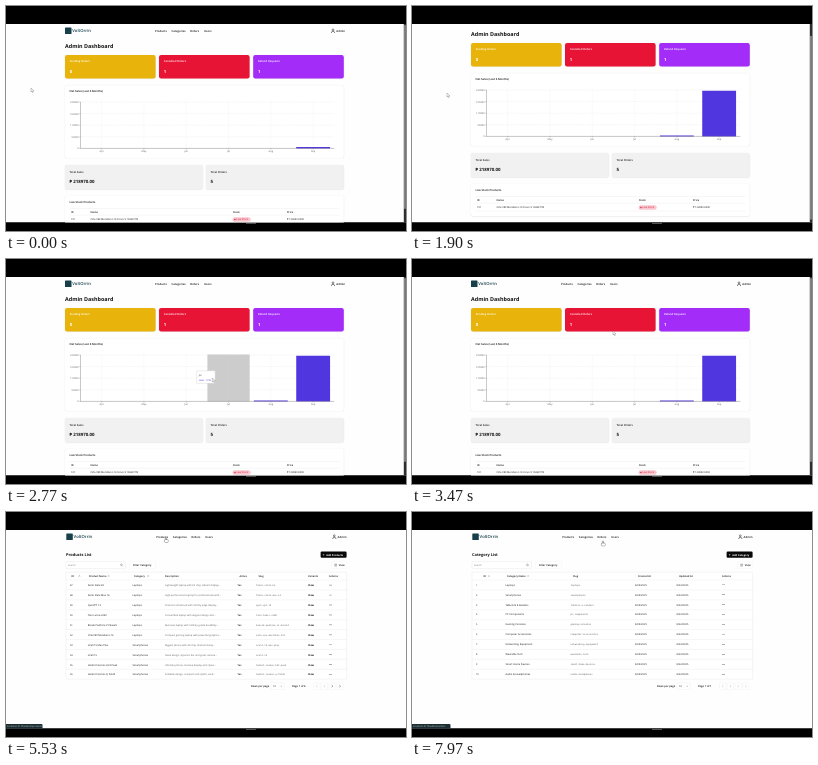
Write an HTML page with a canvas that moves like this. It is 400 px wide and 225 px high and loops after 8 s.

```html
<!DOCTYPE html>
<html lang="en">
<head>
<meta charset="utf-8">
<title>Shop admin</title>
<style>
html, body { margin: 0; width: 100%; height: 100%; overflow: hidden; background: #000; }
canvas { display: block; width: 100vw; height: 100vh; }
</style>
</head>
<body>
<canvas id="stage"></canvas>
<script>
const W = 400, H = 225, LOOP = 8000;
const VIEW = { top: 18, bottom: 216.5 };
const PRODUCTS_AT = 5100, CATEGORIES_AT = 7060;
const SANS = '"Open Sans", "Noto Sans", sans-serif';
const MONO = '"Noto Sans Mono", monospace';
const INK = '#111', GRAY = '#5c5c5c', LINE = '#e9e9e9';

const canvas = document.getElementById('stage');
const ctx = canvas.getContext('2d');

const clamp = v => Math.min(1, Math.max(0, v));
const ease = v => v * v * (3 - 2 * v);

// Keys are [time, ...values], eased between neighbours.
function track(keys, t) {
  if (t <= keys[0][0]) return keys[0].slice(1);
  for (let i = 1; i < keys.length; i++) {
    const a = keys[i - 1], b = keys[i];
    if (t <= b[0]) {
      const k = ease((t - a[0]) / (b[0] - a[0]));
      return a.slice(1).map((v, j) => v + (b[j + 1] - v) * k);
    }
  }
  return keys[keys.length - 1].slice(1);
}

function text(str, x, y, size, { color = INK, weight = 500, font = SANS, align = 'left' } = {}) {
  ctx.save();
  ctx.translate(x, y);
  ctx.scale(0.1, 0.1);
  ctx.font = `${weight} ${size * 10}px ${font}`;
  ctx.textAlign = align;
  ctx.fillStyle = color;
  ctx.fillText(str, 0, 0);
  ctx.restore();
}

function box(x, y, w, h, r, fill, stroke) {
  ctx.beginPath();
  ctx.roundRect(x, y, w, h, r);
  if (fill) { ctx.fillStyle = fill; ctx.fill(); }
  if (stroke) { ctx.strokeStyle = stroke; ctx.lineWidth = 0.4; ctx.stroke(); }
}

function line(points, color, width = 0.4, dash = []) {
  ctx.beginPath();
  points.forEach(([x, y], i) => i ? ctx.lineTo(x, y) : ctx.moveTo(x, y));
  ctx.strokeStyle = color;
  ctx.lineWidth = width;
  ctx.setLineDash(dash);
  ctx.stroke();
  ctx.setLineDash([]);
}

function card(x, y, w, h, fill) {
  ctx.save();
  ctx.shadowColor = 'rgba(0,0,0,.14)';
  ctx.shadowBlur = 1.2 * canvas.width / W;
  ctx.shadowOffsetY = 0.2 * canvas.width / W;
  box(x, y, w, h, 2.2, fill);
  ctx.restore();
}

function header(dx) {
  box(59 + dx, 21.5, 6.5, 6.5, 0.6, '#17404a');
  text('VoltOrrin', 66.3 + dx, 26.4, 4.2, { weight: 600, color: '#17404a' });
  [['Products', 149], ['Categories', 165.5], ['Orders', 184], ['Users', 198]]
    .forEach(([label, x]) => text(label, x + dx, 25.9, 2.75, { weight: 600 }));
  ctx.beginPath();
  ctx.arc(327 + dx, 23.8, 0.9, 0, 7);
  ctx.moveTo(325.3 + dx, 27);
  ctx.arc(327 + dx, 27, 1.7, Math.PI, 0);
  ctx.strokeStyle = INK;
  ctx.lineWidth = 0.5;
  ctx.stroke();
  text('Admin', 330.3 + dx, 26, 2.8, { weight: 600 });
}

// Dashboard

const CHART = { x: 74.5, y: 96, w: 253.8, h: 46.4 };
const BAND = CHART.w / 6;
const MONTHS = ['Apr', 'May', 'Jun', 'Jul', 'Aug', 'Sep'];
const SALES = [0, 0, 0, 0, 0.02, 0.985];

const scrollKeys = [[870, 0], [1000, 5], [1250, 12], [1950, 12], [2480, 0]];
const tipKeys = [[2390, 92, 98.5], [2740, 190, 112], [2980, 205, 108]];

function chart(t, cursor) {
  const { x, y, w, h } = CHART, base = y + h;
  const inside = t > 2100 && cursor[0] > x && cursor[0] < x + w && cursor[1] > y - 1 && cursor[1] < base;
  const hovered = inside ? Math.floor((cursor[0] - x) / BAND) : -1;

  for (let i = 0; i < 5; i++) {
    const gy = y + h * i / 4;
    line([[x, gy], [x + w, gy]], '#d2d2d2', 0.3, [0.7, 0.7]);
    line([[x - 1.2, gy], [x, gy]], '#777');
    text(String(220000 - 55000 * i), x - 1.8, gy + 0.9, 2.5, { color: GRAY, align: 'right' });
  }
  if (hovered >= 0) box(x + hovered * BAND, y - 0.4, BAND, h + 0.4, 0, '#cccccc');

  const grow = 0.025 + 0.975 * (1 - (1 - clamp(t / 430)) ** 3);
  MONTHS.forEach((month, i) => {
    const left = x + i * BAND, mid = left + BAND / 2;
    line([[mid, y], [mid, base]], '#dcdcdc', 0.3, [0.7, 0.7]);
    line([[mid, base], [mid, base + 1.2]], '#777');
    const bar = SALES[i] * h * grow;
    if (bar > 0.1) box(left + BAND * 0.1, base - bar, BAND * 0.8, bar, 0, '#4f36df');
    text(month, mid, base + 4, 2.5, { color: GRAY, align: 'center' });
  });
  line([[x, y], [x, base], [x + w, base]], '#777');

  if (hovered >= 0) {
    const [tx, ty] = track(tipKeys, t);
    box(tx, ty, 18.5, 12.5, 0.3, '#fff', '#ccc');
    text(MONTHS[hovered], tx + 2, ty + 5, 2.4, { color: '#333' });
    text('sales : 0.00', tx + 2, ty + 9.8, 2.4, { color: '#4f36df' });
  }
}

function dashboard(t, cursor) {
  const [scroll] = track(scrollKeys, t);
  ctx.save();
  ctx.translate(0, -scroll);
  header(0);
  text('Admin Dashboard', 59, 41.5, 5.4, { weight: 700 });

  [['Pending Orders', '0', 59, '#e8b30b'],
   ['Cancelled Orders', '1', 153, '#e81435'],
   ['Refund Requests', '1', 247.2, '#a42cf8']].forEach(([label, value, x, fill]) => {
    card(x, 49, 90.6, 23.4, fill);
    text(label, x + 4.7, 56.1, 2.7, { color: '#fff', weight: 600 });
    text(value, x + 4.7, 66.7, 4.2, { color: '#fff', weight: 700 });
  });

  card(59, 79.3, 278.8, 72.6, '#fff');
  text('Net Sales (Last 6 Months)', 63.5, 86.1, 2.75, { weight: 600 });
  chart(t, [cursor[0], cursor[1] + scroll]);

  [['Total Sales', '₱ 218970.00', 59], ['Total Orders', '5', 200]].forEach(([label, value, x]) => {
    card(x, 159, 137.8, 24.4, '#f1f1f1');
    text(label, x + 4.5, 166.6, 2.75, { weight: 600, color: '#222' });
    text(value, x + 4.5, 177, 4.4, { weight: 700 });
  });

  card(59, 189.8, 278.8, 32.5, '#fff');
  text('Low Stock Products', 63.5, 196.7, 2.75, { weight: 600 });
  line([[63.5, 202.5], [333.5, 202.5]], LINE);
  [['ID', 65], ['Name', 84.5], ['Stock', 227], ['Price', 281]]
    .forEach(([label, x]) => text(label, x, 207.1, 2.55, { weight: 600 }));
  line([[63.5, 209.2], [333.5, 209.2]], LINE);
  text('101', 65, 214.4, 2.5);
  text('Orla VEX Meridian L14 Corvo 9 16GB/1TB', 84.5, 214.4, 2.5);
  box(226.5, 211.3, 18.2, 4.4, 2.2, '#f9c6cf');
  box(228.2, 212.8, 1.4, 1.4, 0.7, '#d51f3c');
  text('Low Stock', 230.5, 214.4, 2.5, { color: '#d51f3c' });
  text('₱ 124990.0000', 281, 214.4, 2.5);
  line([[63.5, 217], [333.5, 217]], LINE);
  ctx.restore();

  box(397.8, VIEW.top, 2.2, VIEW.bottom - VIEW.top, 0, '#2e2e2e');
  box(398.2, 19 + scroll * 0.9, 1.5, 184, 0.7, '#9a9a9a');
}

// List pages

const rowLine = i => 73.9 + i * 9.95;
const slugify = name => name.toLowerCase().replace(/&/g, '').replace(/ +/g, '-');

const PRODUCTS = [
  ['Fenlo Slate K2', 'Lightweight laptop with K2 chip, vibrant display...'],
  ['Fenlo Slate Max 14', 'High-performance laptop for professionals with...'],
  ['Quil VPT 13', 'Premium ultrabook with infinity edge display...'],
  ['Tarn Lumis v360', 'Convertible laptop with elegant design and...'],
  ['Brevik PadCore V1 Basalt', 'Business laptop with military-grade durability...'],
  ['Orla VEX Meridian L14', 'Compact gaming laptop with powerful graphics...'],
  ['oCall 15 Max Plus', 'Biggest phone with A9 chip, titanium body...'],
  ['oCall 15', 'Sleek design, dynamic bar and great camera...'],
  ['Hanbit Cosmos H23 Peak', 'Ultimate phone, massive display and stylus...'],
  ['Hanbit Cosmos Q Fold5', 'Foldable design, compact and stylish, vivid...']
];
const CATEGORIES = ['Laptops', 'Smartphones', 'Tablets & E-Readers', 'PC Components', 'Gaming Consoles',
  'Computer Accessories', 'Networking Equipment', 'Wearable Tech', 'Smart Home Devices', 'Audio & Headphones'];

function sortMark(x, y) {
  line([[x, y - 1.1], [x + 0.6, y - 1.7], [x + 1.2, y - 1.1]], '#444', 0.3);
  line([[x, y - 0.6], [x + 0.6, y], [x + 1.2, y - 0.6]], '#444', 0.3);
}

function dots(x, y) {
  for (let i = 0; i < 3; i++) box(x + i * 1.1, y - 1.2, 0.7, 0.7, 0.35, INK);
}

function listPage(title, action, columns, pages) {
  header(1.3);
  text(title, 60, 44.2, 3.95, { weight: 700 });
  box(314.6, 39.5, 26, 6.3, 1.2, '#080808');
  text('+', 316.8, 43.7, 3.2, { color: '#fff', weight: 700 });
  text(action, 320.2, 43.6, 2.55, { color: '#fff', weight: 700 });

  box(60, 49.6, 59.5, 7, 1, '#fff', '#e2e2e2');
  text('Search', 62, 54, 2.4, { color: '#777' });
  ctx.beginPath();
  ctx.arc(115.4, 52.8, 0.9, 0, 7);
  ctx.strokeStyle = GRAY;
  ctx.lineWidth = 0.35;
  ctx.stroke();
  line([[116, 53.5], [116.8, 54.3]], GRAY, 0.35);
  box(123.5, 49.6, 26, 7, 1, '#fff', '#f0f0f0');
  text('Filter Category', 127, 53.9, 2.6, { weight: 600 });
  box(325.5, 49.6, 15.2, 7, 1, '#fff', '#f0f0f0');
  line([[328.3, 52.3], [331, 52.3]], INK);
  line([[328.3, 53.9], [331, 53.9]], INK);
  text('View', 332.8, 53.9, 2.6, { weight: 600 });

  box(60, 60.2, 280.7, 107, 1.2, '#fff', '#e2e2e2');
  columns.forEach(([label, x, sortX]) => {
    text(label, x, 65, 2.5, { weight: 600 });
    if (sortX) sortMark(sortX, 65);
  });
  for (let i = 0; i < 10; i++) {
    const y = 68 + i * 9.92;
    line([[60, y], [340.7, y]], LINE);
  }

  text('Rows per page', 245, 175.2, 2.6, { weight: 600 });
  box(265, 170.8, 13, 6.8, 1, '#fff', '#eaeaea');
  text('10', 267, 175.1, 2.5);
  line([[274.4, 173.8], [275.2, 174.6], [276, 173.8]], GRAY, 0.35);
  text('Page 1 of ' + pages, 286, 175.2, 2.6, { weight: 600 });
  [0, 1, 2, 3].forEach(i => {
    const x = 307.6 + i * 7.7, color = i < 2 || pages === 1 ? '#aaa' : INK, d = i < 2 ? -0.6 : 0.6;
    box(x, 170.8, 6.4, 6.8, 1, '#fff', '#eee');
    line([[x + 3.2 - d, 173.1], [x + 3.2 + d, 174.2], [x + 3.2 - d, 175.3]], color, 0.4);
  });
}

function productsPage() {
  listPage('Products List', 'Add Products', [['ID', 65.5, 72.8], ['Product Name', 83, 102], ['Category', 128, 141.5],
    ['Description', 159], ['Active', 233.5], ['Slug', 252.5], ['Variants', 302], ['Actions', 323]], 6);
  PRODUCTS.forEach(([name, about], i) => {
    const y = rowLine(i);
    text(String(47 + i), 64, y, 2.4);
    text(name, 81.7, y, 2.5);
    text(i < 6 ? 'Laptops' : 'Smartphones', 126.5, y, 2.5);
    text(about, 159, y, 2.45, { color: GRAY });
    text('Yes', 231.5, y, 2.45, { weight: 600 });
    text(slugify(name), 250, y, 2.3, { color: GRAY, font: MONO });
    text('View', 302, y, 2.5, { weight: 700 });
    dots(323, y);
  });
}

function categoriesPage() {
  listPage('Category List', 'Add Category', [['ID', 71.5, 76.3], ['Category Name', 95, 115.5], ['Slug', 161],
    ['Created At', 226], ['Updated At', 267], ['Actions', 310]], 1);
  CATEGORIES.forEach((name, i) => {
    const y = rowLine(i) - 0.3;
    text(String(i + 1), 64, y, 2.4);
    text(name, 93.5, y, 2.5);
    text(slugify(name), 158.5, y, 2.3, { color: GRAY, font: MONO });
    text('8/24/2025', 223, y, 2.5);
    text('8/24/2025', 264.5, y, 2.5);
    dots(310, y);
  });
}

// Pointer and link preview

const cursorKeys = [
  [0, 25, 82], [400, 15, 86], [830, 35, 87], [2120, 35, 87], [2390, 180, 136.5], [2560, 181, 137],
  [2850, 212, 115], [3250, 201, 72], [3500, 201, 72], [4120, 160, 25.5], [5830, 160, 25.5],
  [6020, 186, 31], [6230, 173.5, 27], [7750, 173.5, 27], [7970, 191, 29]
];
const previewKeys = [[4050, 0], [4200, 1], [5870, 1], [6000, 0], [6310, 0], [6530, 1]];

function linkPreview(t) {
  const page = t < 6200 ? 'products' : t < 7860 ? 'categories' : 'orders';
  ctx.save();
  ctx.globalAlpha = track(previewKeys, t)[0];
  box(0, 212, page === 'products' ? 36.5 : 38.5, 5, [0, 1, 0, 0], '#1d2e33');
  text('localhost:5173/admin/' + page, 1, 215.3, 2.4, { color: '#b9c8cc' });
  ctx.restore();
}

function pointer([x, y], hand) {
  ctx.save();
  ctx.translate(x, y);
  if (hand) {
    box(-1.6, 2, 3.8, 2.9, 1, '#fff', '#333');
    box(-0.6, 0, 1.1, 3.5, 0.5, '#fff', '#333');
    box(-1.2, 2.6, 3, 1.8, 0.6, '#fff');
  } else {
    ctx.beginPath();
    [[0, 0], [0, 4], [0.95, 3.1], [1.6, 4.6], [2.2, 4.3], [1.6, 2.9], [2.9, 2.9]]
      .forEach(p => ctx.lineTo(...p));
    ctx.closePath();
    ctx.fillStyle = '#fff';
    ctx.fill();
    ctx.strokeStyle = '#777';
    ctx.lineWidth = 0.4;
    ctx.stroke();
  }
  ctx.restore();
}

function draw(t) {
  const scale = window.devicePixelRatio || 1;
  const pw = Math.round(innerWidth * scale), ph = Math.round(innerHeight * scale);
  if (canvas.width !== pw || canvas.height !== ph) { canvas.width = pw; canvas.height = ph; }
  ctx.setTransform(pw / W, 0, 0, ph / H, 0, 0);
  ctx.textRendering = 'geometricPrecision';
  box(0, 0, W, H, 0, '#000');
  box(240, 217, 10, 0.8, 0, '#666');

  const cursor = track(cursorKeys, t);
  const onLink = t > 4050 && (t < 5900 || t > 6150);
  ctx.save();
  ctx.beginPath();
  ctx.rect(0, VIEW.top, W, VIEW.bottom - VIEW.top);
  ctx.clip();
  box(0, VIEW.top, W, VIEW.bottom - VIEW.top, 0, '#fefefe');
  if (t < PRODUCTS_AT) dashboard(t, cursor);
  else if (t < CATEGORIES_AT) productsPage();
  else categoriesPage();
  linkPreview(t);
  pointer(cursor, onLink);
  ctx.restore();
}

function tick() {
  draw(performance.now() % LOOP);
  requestAnimationFrame(tick);
}
tick();
</script>
</body>
</html>
```
